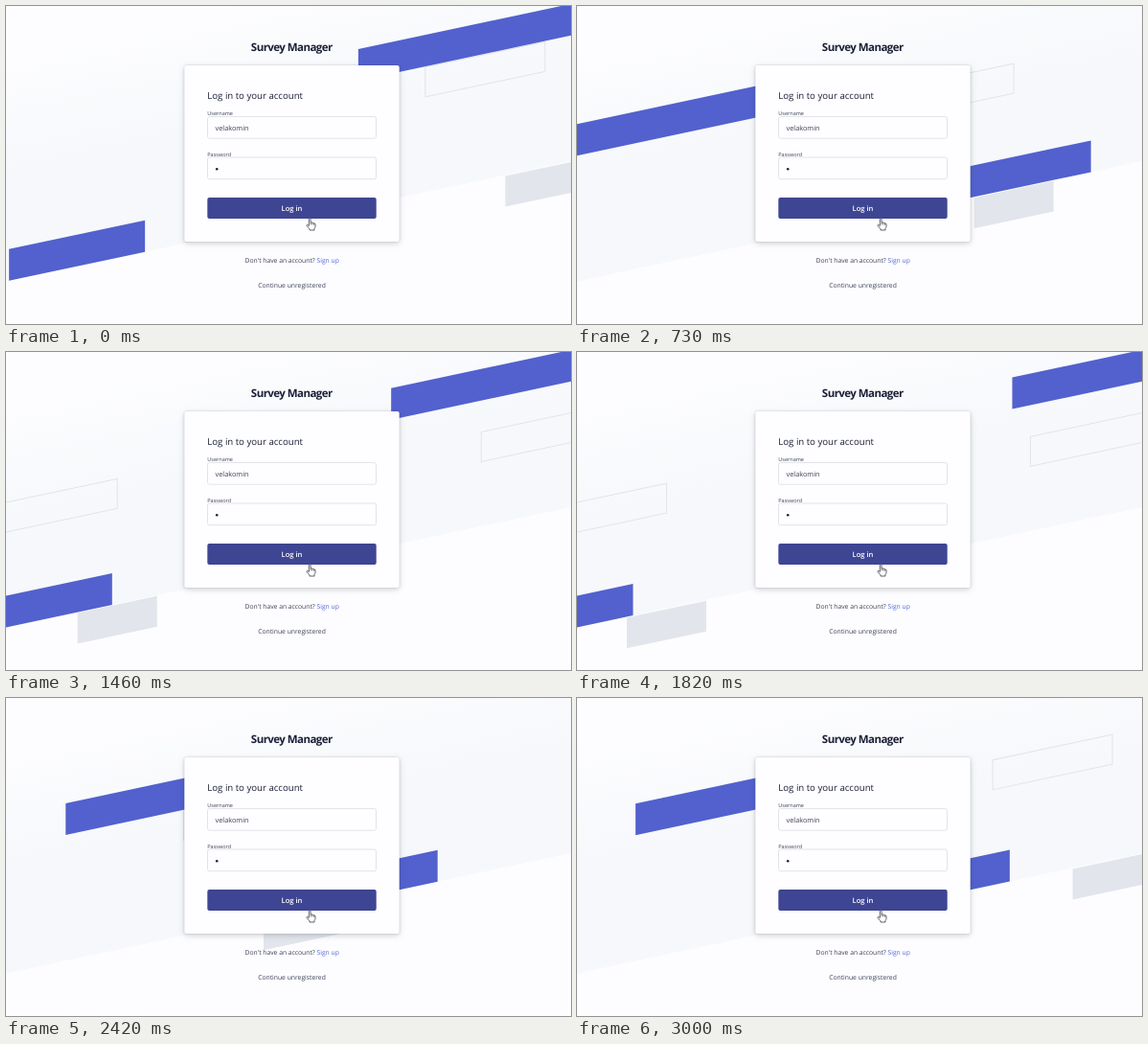
Recreate the animation shown at these times as an HTML page. Size 590 px wide and 332 px high, loop 3030 ms.

```html
<!DOCTYPE html>
<html lang="en">
<head>
<meta charset="utf-8">
<title>Log in</title>
<style>
  html, body { margin: 0; width: 100%; height: 100%; overflow: hidden; background: #fdfdff; }
  svg { display: block; width: 100%; height: 100%; }
  text { font-family: "Open Sans", "Noto Sans", sans-serif; fill: #3c4257; text-rendering: geometricPrecision; }
  .mid { text-anchor: middle; }
  .title { font-size: 11.5px; font-weight: 700; letter-spacing: -.55px; fill: #1a1f36; }
  .head { font-size: 9.65px; fill: #1a1f36; }
  .label { font-size: 5.5px; }
  .value { font-size: 7.3px; }
  .action { font-size: 7.6px; font-weight: 600; fill: #fff; }
  .note { font-size: 6.78px; }
  .link { fill: #5469d4; }
  .bar { fill: #5261cd; }
  .pale { fill: #e2e5ec; }
  .frame { fill: none; stroke: #e1e4e9; }
  .field { fill: #fefdff; stroke: #dfe1e7; stroke-width: .9; }
  .card { fill: #fefdff; filter: drop-shadow(0 2.5px 3px rgba(60, 66, 87, .2)) drop-shadow(0 .8px 1px rgba(0, 0, 0, .16)); }
</style>
</head>
<body>
<svg viewBox="0 0 590 332">
  <defs>
    <linearGradient id="haze" gradientUnits="userSpaceOnUse" x1="0" y1="50" x2="0" y2="175">
      <stop offset="0" stop-color="#fdfdff"/>
      <stop offset="1" stop-color="#f6f8fb"/>
    </linearGradient>
  </defs>

  <g transform="skewY(-12)">
    <rect width="590" height="287.4" fill="url(#haze)"/>
    <g id="slow">
      <rect class="frame" x=".5" y="157" width="125" height="31"/>
      <rect class="frame" x="505.5" y="189" width="125" height="31"/>
      <rect class="pale" x="84" y="288.4" width="83" height="32"/>
    </g>
    <rect id="upper" class="bar" y="123.2" width="226" height="33"/>
    <rect id="lower" class="bar" y="254.5" width="142" height="33"/>
  </g>

  <text class="title mid" x="298.3" y="46.6">Survey Manager</text>
  <rect class="card" x="186.3" y="62" width="224.4" height="184" rx="2"/>
  <text class="head" x="210.3" y="97">Log in to your account</text>

  <text class="label" x="210.3" y="114">Username</text>
  <rect class="field" x="210.5" y="115.5" width="176" height="22.7" rx="2"/>
  <text class="value" x="218.6" y="129.7">velakomin</text>

  <text class="label" x="210.3" y="156.5">Password</text>
  <rect class="field" x="210.5" y="158" width="176" height="22.7" rx="2"/>
  <circle cx="220.2" cy="170.2" r="1.25" fill="#1a1f36"/>

  <rect x="210.3" y="200" width="176.4" height="22" rx="2" fill="#3e4592"/>
  <text class="action mid" x="298.5" y="213.8">Log in</text>

  <text class="note mid" x="298.7" y="268">Don't have an account? <tspan class="link">Sign up</tspan></text>
  <text class="note mid" x="298.5" y="293.7">Continue unregistered</text>

  <path d="M316.3 229.6V222.7Q316.4 221.6 317.2 221.6T318.1 222.7V226
    Q319.4 225.4 319.8 226.3Q321 225.8 321.4 226.8Q323 226.6 323 228V230.3
    Q322.8 231.6 322 232.4V234H317V232.8L314.1 229.6Q313.6 228.6 314.6 228.2Z"
    fill="#fff" stroke="#3a3a42" stroke-width=".8" stroke-linejoin="round"/>
  <path d="M318.1 226V228.4M319.8 226.5V228.5M321.4 227V228.8" stroke="#3a3a42" stroke-width=".6"/>
</svg>

<script>
  const LOOP = 3030, RANGE = 490, TURN = 1712;
  const [slow, upper, lower] = ["slow", "upper", "lower"].map(id => document.getElementById(id));
  const start = performance.now();

  // cubic-bezier(.42, 0, .58, 1), solved by bisection
  function ease(p) {
    let lo = 0, hi = 1, s;
    for (let i = 0; i < 24; i++) {
      s = (lo + hi) / 2;
      const x = 3 * (1 - s) * s * (.42 * (1 - s) + .58 * s) + s ** 3;
      if (x < p) lo = s; else hi = s;
    }
    return s * s * (3 - 2 * s);
  }

  // Eased swing, 0 at the given moment and 1 half a cycle away
  function swing(t, low, half) {
    const p = Math.abs(t - low) / half % 2;
    return RANGE * ease(p > 1 ? 2 - p : p);
  }

  function move(el, x) {
    el.setAttribute("transform", `translate(${x.toFixed(2)} 0)`);
  }

  function draw() {
    const t = Math.max(22, (performance.now() - start) % LOOP);
    const x = swing(t, TURN - 1000, 1000) - 24;
    move(upper, x);
    move(lower, 371 - x);
    move(slow, swing(t, TURN, 1500) - 37);
    requestAnimationFrame(draw);
  }
  draw();
</script>
</body>
</html>
```
